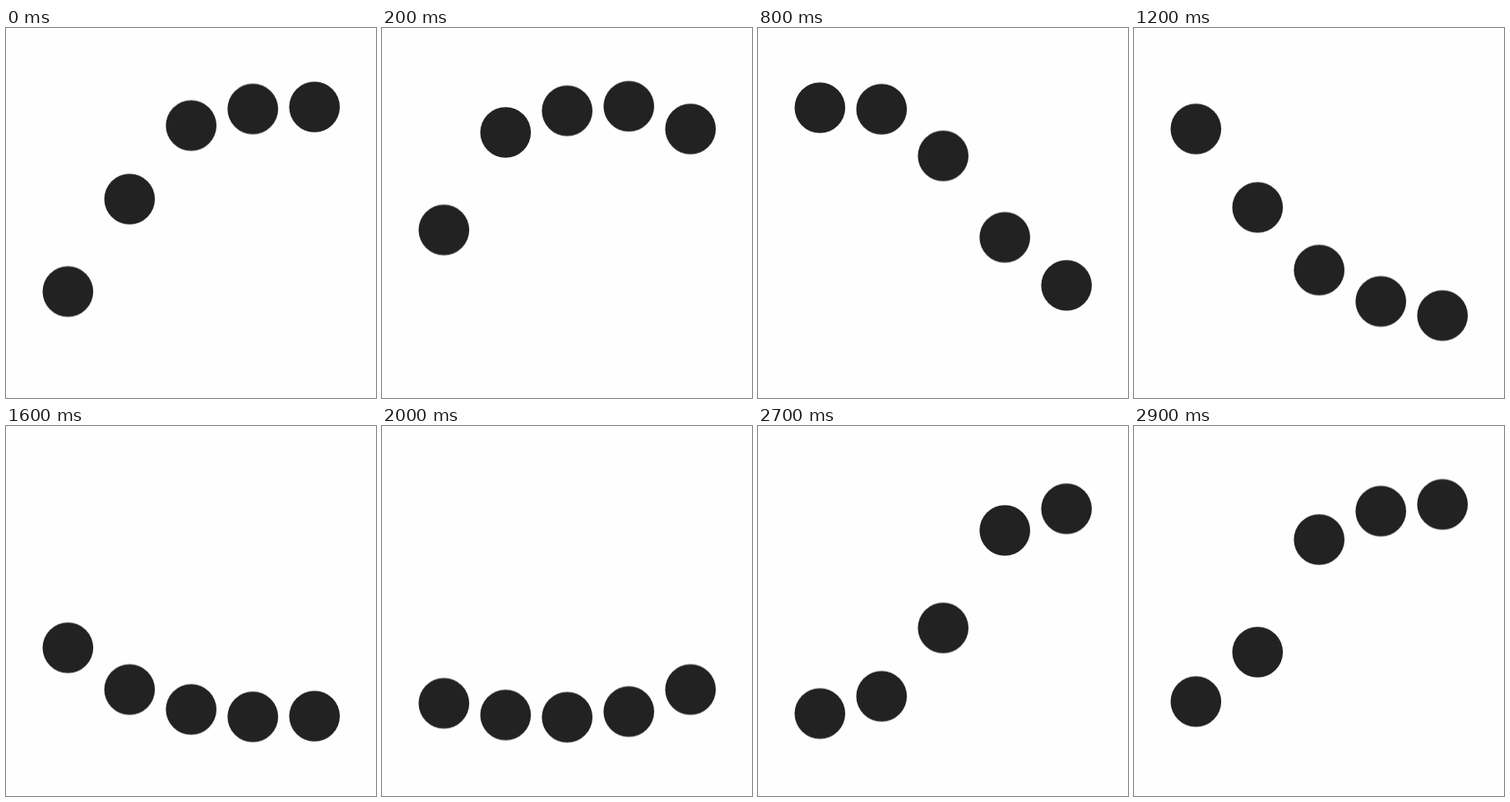
Write an HTML page that moves like this. It is 450 px wide and 450 px high and loops after 3000 ms.

```html
<!DOCTYPE html>
<html lang="en">
<head>
<meta charset="utf-8">
<title>Wave of dots</title>
<style>
  html, body {
    margin: 0;
    width: 100%;
    height: 100%;
    overflow: hidden;
    background: #fefefe;
  }
  svg {
    display: block;
    width: 100vw;
    height: 100vh;
  }
  circle {
    fill: #222;
    /* each dot trails its right-hand neighbour by 250 ms */
    animation: bob 3s infinite paused;
    animation-delay: calc((var(--lag) * 250 - 3050 - var(--t)) * 1ms);
  }
  @keyframes bob {
    0%, 100% {
      transform: translateY(95.2px);
      animation-timing-function: cubic-bezier(.35, 0, .235, 1);
    }
    50% {
      transform: translateY(354.4px);
      animation-timing-function: cubic-bezier(.8, 0, .25, 1);
    }
  }
</style>
</head>
<body>
<svg viewBox="0 0 450 450" style="--t: 0">
  <circle cx="75.3" r="30.8" style="--lag: 4"/>
  <circle cx="150.3" r="30.8" style="--lag: 3"/>
  <circle cx="225.2" r="30.8" style="--lag: 2"/>
  <circle cx="300.2" r="30.8" style="--lag: 1"/>
  <circle cx="375.2" r="30.8" style="--lag: 0"/>
</svg>
<script>
  const LOOP = 3000, STEP = 100;
  const stage = document.querySelector('svg');

  // the motion advances in steps of 100 ms
  function tick() {
    const t = performance.now() % LOOP;
    stage.style.setProperty('--t', Math.floor(t / STEP) * STEP);
    requestAnimationFrame(tick);
  }
  tick();
</script>
</body>
</html>
```
